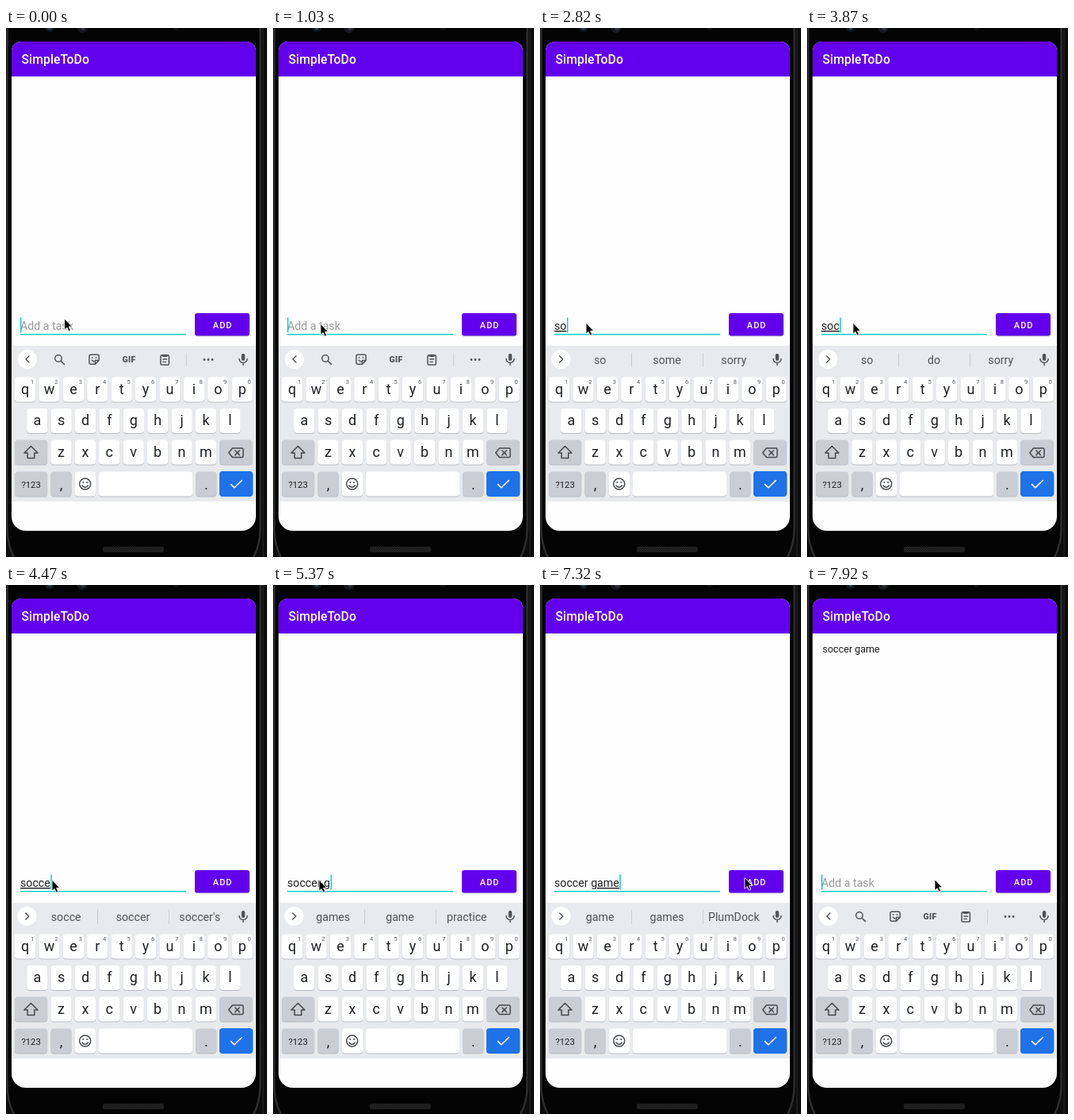
An HTML page that plays this animation: 329 px wide and 666 px high, repeating every 8000 ms.

```html
<!DOCTYPE html>
<html lang="en">
<head>
<meta charset="utf-8">
<title>To-do app</title>
<style>
html, body { margin: 0; width: 100%; height: 100%; overflow: hidden; background: #000; }
svg { display: block; width: 329px; height: 666px; font-family: Roboto, "Noto Sans", sans-serif; }
text { white-space: pre; }
.mid { text-anchor: middle; }
.key { font-size: 18px; fill: #1f2023; }
.num { font-size: 7.5px; fill: #55585c; }
.word { font-size: 14.2px; fill: #505357; }
.field { font-size: 14.2px; fill: #202020; }
.under { text-decoration: underline; text-decoration-skip-ink: none; }
.icon { fill: none; stroke: #505357; stroke-width: 1.5; stroke-linecap: round; stroke-linejoin: round; }
</style>
</head>
<body>
<svg viewBox="0 0 329 666">
  <defs>
    <clipPath id="screen"><path d="M7 29a12 12 0 0 1 12-12H303a12 12 0 0 1 12 12V615a18 18 0 0 1-18 18H25a18 18 0 0 1-18-18Z"/></clipPath>
    <pattern id="mesh" width="3" height="3" patternUnits="userSpaceOnUse">
      <rect width="3" height="3" fill="#191919"/><path d="M0 3L3 0" stroke="#303030" stroke-width=".8"/>
    </pattern>
  </defs>

  <!-- phone body -->
  <rect width="329" height="666" fill="#0c0c0d"/>
  <path d="M1.5-5V630Q1.5 652 12 670H310Q320.5 652 320.5 630V-5Z" fill="#040404" stroke="#2e2e30" stroke-width="2.4"/>
  <path d="M324 0V666" stroke="#1a1a1b" stroke-width="2"/>
  <circle cx="55" cy="-1" r="6" fill="#15181d"/><circle cx="55" cy="0" r="2.5" fill="#2d3a48"/>
  <circle cx="96" cy="-1" r="7" fill="#17191c"/><circle cx="97" cy="0" r="3" fill="#30343a"/>
  <circle cx="214" cy="-1" r="4" fill="#101113"/>
  <rect x="122" y="653" width="77" height="7" rx="2" fill="url(#mesh)"/>

  <!-- app -->
  <g clip-path="url(#screen)">
    <rect x="7" y="17" width="308" height="616" fill="#fefefe"/>
    <rect x="7" y="17" width="308" height="44" fill="#6200ee"/>
    <rect x="7" y="400" width="308" height="196" fill="#e8eaed"/>
  </g>
  <text x="19.5" y="45.4" font-size="15.7" font-weight="500" letter-spacing=".1" fill="#fff">SimpleToDo</text>
  <text id="item" x="19.5" y="84.6" font-size="12.54" fill="#202020">soccer game</text>
  <rect x="238" y="360" width="69" height="28.5" rx="3" fill="#000" opacity=".18"/>
  <rect id="button" x="238" y="359" width="69" height="28.4" rx="3" fill="#6200ee"/>
  <text class="mid" x="273.2" y="377.6" font-size="11" font-weight="500" letter-spacing="1" fill="#fff">ADD</text>
  <text id="hint" class="field" x="18" y="380" style="fill:#9b9b9b">Add a task</text>
  <text class="field" x="18" y="380"><tspan id="plain"></tspan><tspan id="under" class="under"></tspan></text>
  <rect x="18" y="385" width="209" height="1.5" fill="#0cd2c0"/>
  <rect id="caret" y="364.5" width="1.5" height="19" fill="#0cd2c0"/>

  <!-- strip above the keys -->
  <g id="tools">
    <circle cx="27" cy="417" r="12" fill="#fff"/>
    <g class="icon">
      <path d="M29 413L25 417L29 421"/>
      <circle cx="66" cy="416" r="4.2"/><path d="M69.2 419.2L73.4 423.4"/>
      <path d="M107 411.2H115.2A2 2 0 0 1 117.2 413.2V418.5L112.5 423.2H107A2 2 0 0 1 105 421.2V413.2A2 2 0 0 1 107 411.2ZM112.5 423V418.5H117M108.3 418.2Q109.5 420 111 420"/>
      <path d="M108.7 415V415.1M113.5 415V415.1" stroke-width="1.8"/>
      <rect x="195" y="412" width="10.4" height="12" rx="1.2"/>
      <path d="M198 412.4H202.4" stroke-width="3"/>
      <path d="M197.8 417H202.6M197.8 420.3H201.5" stroke-width="1.3"/>
      <path d="M250 417.5V417.6M255 417.5V417.6M260 417.5V417.6" stroke-width="2.8"/>
    </g>
    <text class="mid" x="155" y="421" font-size="10.5" font-weight="800" letter-spacing=".3" fill="#505357">GIF</text>
    <path d="M227.5 409V426" stroke="#d0d3d7"/>
  </g>
  <g id="words">
    <circle cx="26.5" cy="417" r="12" fill="#fff"/>
    <path class="icon" d="M24.8 413L28.8 417L24.8 421"/>
    <path d="M115.5 409V427M205.5 409V427" stroke="#cccfd4"/>
    <text class="word mid" x="75.7" y="423"></text>
    <text class="word mid" x="160" y="423"></text>
    <text class="word mid" x="244.3" y="423"></text>
  </g>
  <rect x="296.8" y="410" width="4.4" height="9" rx="2.2" fill="#505357"/>
  <path class="icon" d="M294 416.5a5 5 0 0 0 10 0M299 421.5V424.5"/>

  <g id="keys"></g>
  <g class="icon" style="stroke:#45484c">
    <path d="M31.5 526.5L40 535H35.8V541.5H27.2V535H23Z"/>
    <path d="M285.4 529H297.6A1.5 1.5 0 0 1 299 530.5V539A1.5 1.5 0 0 1 297.6 540.5H285.4L280.8 534.7ZM288.8 532L294.4 537.6M294.4 532L288.8 537.6"/>
    <circle cx="99.7" cy="574" r="7"/>
    <path d="M96 576Q99.7 580.5 103.4 576"/>
    <path d="M97.3 572V572.1M102.1 572V572.1" stroke-width="2"/>
    <path d="M283.6 574.6L287.8 578.8L297.2 569.6" stroke="#fff" stroke-width="1.6"/>
  </g>

  <path id="mouse" d="M0 0V14L3.1 11.1L5.2 15.8L7.7 14.7L5.6 10.1H9.8Z" fill="#000" stroke="#fff" stroke-width=".9"/>
</svg>
<script>
const LOOP = 8000;
const $ = id => document.getElementById(id);

function addKey(x, y, w, fill, label = "", baseline = 21, shadow = "#b9bcc2") {
  return `<rect x="${x}" y="${y + 1}" width="${w}" height="31" rx="4" fill="${shadow}"/>
    <rect x="${x}" y="${y}" width="${w}" height="31" rx="4" fill="${fill}"/>
    <text class="key mid" x="${x + w / 2}" y="${y + baseline}">${label}</text>`;
}

function buildKeys() {
  const pitch = 30.4, white = "#fff", gray = "#cacdd3", blue = "#1f72e8";
  const rows = [["qwertyuiop", 11, 439.5], ["asdfghjkl", 26.2, 479], ["zxcvbnm", 56.4, 518.5]];
  let out = "";
  for (const [letters, left, y] of rows) {
    [...letters].forEach((c, i) => {
      const x = left + i * pitch;
      out += addKey(x, y, 26.2, white, c);
      if (y < 450) out += `<text class="num mid" x="${x + 22}" y="448">${(i + 1) % 10}</text>`;
    });
  }
  out += addKey(11, 518.5, 41.2, gray) + addKey(269.2, 518.5, 41.8, gray);
  out += addKey(11, 558.5, 41.2, gray, '<tspan font-size="11.3">?123</tspan>', 20);
  out += addKey(56.4, 558.5, 26.2, gray, ",", 22);
  out += addKey(86.8, 558.5, 26.2, white) + addKey(117, 558.5, 118, white);
  out += addKey(239.2, 558.5, 26.2, gray, ".", 22);
  out += addKey(269, 558, 42.2, blue, "", 21, blue);
  $("keys").innerHTML = out;
}

// Each step changes only the listed properties from its time on.
const steps = [
  [0, { plain: "", under: "", words: "", caret: 1, mouse: [73.7, 366], item: 0, button: "#6200ee" }],
  [440, { mouse: [73, 369] }],
  [590, { mouse: [71, 373], caret: 0 }],
  [740, { mouse: [67, 375] }],
  [890, { mouse: [63, 374] }],
  [1030, { mouse: [60, 372.5], caret: 1 }],
  [1180, { mouse: [58, 371.3] }],
  [1330, { caret: 0 }],
  [1480, { caret: 1 }],
  [1920, { plain: "s" }],
  [2220, { plain: "", under: "s" }],
  [2370, { words: "s see sorry" }],
  [2670, { under: "so" }],
  [2820, { words: "so some sorry" }],
  [3120, { words: "so do sorry" }],
  [3420, { caret: 0 }],
  [3720, { caret: 1 }],
  [3870, { under: "soc" }],
  [4020, { words: "soc soccer social" }],
  [4320, { under: "socc" }],
  [4470, { under: "socce", words: "socce soccer soccer's" }],
  [4620, { under: "soccer", words: "soccer soccer's succeed", caret: 0 }],
  [4920, { plain: "soccer ", under: "", words: "games game practice" }],
  [5370, { plain: "soccer g", caret: 1 }],
  [5520, { plain: "soccer ", under: "g", words: "game games good" }],
  [5670, { under: "ga" }],
  [5820, { under: "gam", words: "game games PlumDock" }],
  [6120, { plain: "soccer game", under: "", words: "is at tomorrow" }],
  [6270, { plain: "soccer ", under: "game", words: "game games PlumDock" }],
  [6720, { mouse: [84, 380] }],
  [6870, { mouse: [142, 387], caret: 0 }],
  [7020, { mouse: [208, 386] }],
  [7170, { mouse: [248, 376] }],
  [7320, { mouse: [258, 368.5], caret: 1 }],
  [7470, { button: "#8133f1" }],
  [7620, { plain: "", under: "", item: .35 }],
  [7770, { words: "", item: .8, mouse: [220, 370], button: "#6200ee" }],
  [7920, { item: 1, mouse: [161, 370.7] }]
];

function stateAt(time) {
  return Object.assign({}, ...steps.filter(([start]) => start <= time).map(([, change]) => change));
}

const slots = document.querySelectorAll("#words text");
function draw() {
  const s = stateAt(performance.now() % LOOP);
  const words = s.words.split(" ");
  $("plain").textContent = s.plain;
  $("under").textContent = s.under;
  const typed = s.plain + s.under;
  $("hint").style.display = typed ? "none" : "";
  const width = typed ? $("plain").parentNode.getComputedTextLength() + .5 : 0;
  $("caret").setAttribute("x", 18 + width);
  $("caret").style.opacity = s.caret;
  $("tools").style.display = s.words ? "none" : "";
  $("words").style.display = s.words ? "" : "none";
  slots.forEach((slot, i) => slot.textContent = words[i] || "");
  $("item").style.opacity = s.item;
  $("button").setAttribute("fill", s.button);
  $("mouse").setAttribute("transform", `translate(${s.mouse})`);
  requestAnimationFrame(draw);
}

buildKeys();
draw();
</script>
</body>
</html>
```
